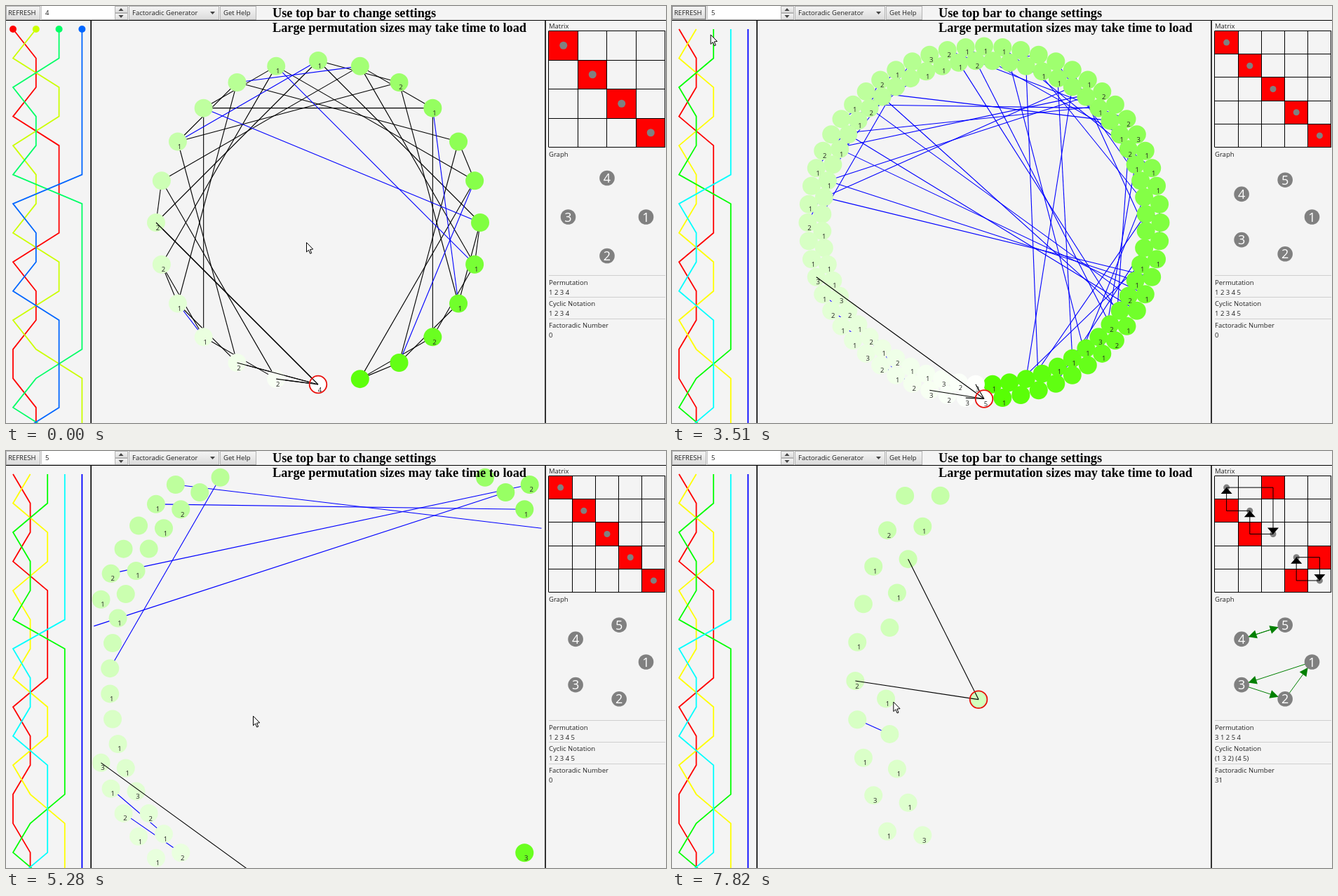
Write an HTML page with a canvas that moves like this. It is 941 px wide and 595 px high and loops after 7.99 s.

```html
<!DOCTYPE html>
<html lang="en">
<head>
<meta charset="utf-8">
<title>Permutation explorer</title>
<style>
html, body { margin: 0; width: 941px; height: 595px; overflow: hidden; background: #f4f4f4; }
canvas { display: block; }
</style>
</head>
<body>
<canvas id="stage" width="941" height="595"></canvas>
<script>
const g = document.getElementById('stage').getContext('2d');
const LOOP = 7990, STEP = 77, TAU = Math.PI * 2;
const SANS = '"Open Sans", "Noto Sans", sans-serif';
const SERIF = '"Liberation Serif", serif';
const REFRESH_AT = 2800, COUNT_AT = 1800, PICK_AT = 6580, DROP_AT = 7270;
const VIEW = { l: 122, t: 21, r: 768, b: 595 };
const DOT = 13;

// time, x, y
const POINTER = [
  [110, 428, 337], [190, 431, 337], [343, 431, 337], [1190, 144, 6], [1420, 164, 8],
  [1573, 164, 8], [1900, 184, 20], [2420, 50, 24], [2500, 8, 27], [2573, 8, 27],
  [2650, 27, 13], [3430, 29, 13], [4280, 350, 356], [4660, 352, 362], [5280, 352, 378],
  [6200, 413, 315], [6580, 306, 304], [7270, 438, 356], [7363, 438, 357],
  [7600, 385, 371], [7820, 312, 357]
];
// time, zoom, centre x, centre y
const CAMERA = [
  [4273, 1, 445, 309], [4350, 1.1, 445, 309], [4500, 1.1, 445, 309], [4580, 1.2, 449, 312],
  [4660, 1.3, 453.5, 316.5], [5280, 1.5, 495, 328.5], [6200, 2.1, 789.5, 328]
];

function track(keys, t) {
  if (t <= keys[0][0]) return keys[0].slice(1);
  for (let i = 1; i < keys.length; i++) {
    const a = keys[i - 1], b = keys[i];
    if (t < b[0]) {
      const u = (t - a[0]) / (b[0] - a[0]);
      return a.slice(1).map((v, j) => v + (b[j + 1] - v) * u);
    }
  }
  return keys[keys.length - 1].slice(1);
}

function permutations(items) {
  if (!items.length) return [[]];
  return items.flatMap(v => permutations(items.filter(w => w !== v)).map(p => [v, ...p]));
}

// Nodes in lexicographic order, joined to inverses and to adjacent value swaps
function buildGraph(n) {
  const perms = permutations([...Array(n).keys()]);
  const index = new Map(perms.map((p, i) => [p.join(), i]));
  return {
    n,
    size: perms.length,
    fixed: perms.map(p => p.filter((v, i) => v === i).length),
    inverse: perms.map(p => index.get(p.map((_, i) => p.indexOf(i)).join())),
    near: perms.map(p => [...Array(n - 1).keys()].map(a =>
      index.get(p.map(v => v === a ? a + 1 : v === a + 1 ? a : v).join())))
  };
}
const graphs = { 4: buildGraph(4), 5: buildGraph(5) };

function line(color, width, ...pts) {
  g.beginPath();
  pts.forEach(p => g.lineTo(p[0], p[1]));
  g.strokeStyle = color;
  g.lineWidth = width;
  g.stroke();
}
function disc(x, y, r, color) {
  g.beginPath();
  g.arc(x, y, r, 0, TAU);
  g.fillStyle = color;
  g.fill();
}
function shape(color, ...pts) {
  g.beginPath();
  pts.forEach(p => g.lineTo(p[0], p[1]));
  g.closePath();
  g.fillStyle = color;
  g.fill();
}
function text(s, x, y, size = 9.5, color = '#222', align = 'left') {
  g.font = size + 'px ' + SANS;
  g.textAlign = align;
  g.fillStyle = color;
  g.fillText(s, x, y);
}
// Triangle whose tip is at (x, y), pointing along angle a
function arrow(x, y, a, length, half, color) {
  const c = Math.cos(a), s = Math.sin(a), bx = x - length * c, by = y - length * s;
  shape(color, [x, y], [bx - half * s, by + half * c], [bx + half * s, by - half * c]);
}

function button(x, y, w, h) {
  const fill = g.createLinearGradient(0, y, 0, y + h);
  fill.addColorStop(0, '#f6f6f6');
  fill.addColorStop(1, '#dadada');
  g.fillStyle = fill;
  g.fillRect(x, y, w, h);
  g.strokeStyle = '#b4b4b4';
  g.lineWidth = 1;
  g.strokeRect(x + .5, y + .5, w - 1, h - 1);
}

function drawToolbar(count, hover) {
  button(0, 0, 49, 20);
  if (hover) {
    g.strokeStyle = '#888';
    g.strokeRect(.5, .5, 47, 18);
  }
  text('REFRESH', 3, 13);
  g.fillStyle = '#fff';
  g.fillRect(50, 0, 105, 19);
  line('#c4c4c4', 1, [50.5, 0], [50.5, 19.5], [155, 19.5]);
  text(count, 56, 13);
  button(155, 0, 19, 10);
  button(155, 10, 19, 10);
  arrow(164, 3, -Math.PI / 2, 4, 3.5, '#444');
  arrow(164, 17, Math.PI / 2, 4, 3.5, '#444');
  button(175, 0, 129, 20);
  text('Factoradic Generator', 180, 13);
  arrow(294.5, 12, Math.PI / 2, 4, 3.5, '#444');
  button(305, 0, 52, 20);
  text('Get Help', 310, 13);
  line('#000', 1, [0, 20.5], [941, 20.5]);
}

// Strands follow the swaps of Heap's algorithm
function drawStrands(n) {
  const swaps = '01 02 01 02 01 03 01 02 01 02 01 13 01 02'.split(' ');
  const gap = 98.4 / (n - 1), slots = [...Array(n).keys()];
  const paths = slots.map(i => [[10 + i * gap, 33]]);
  swaps.forEach((s, k) => {
    const [a, b] = s;
    [slots[a], slots[b]] = [slots[b], slots[a]];
    slots.forEach((id, i) => paths[id].push([10 + i * gap, 33 + 41.53 * (k + 1)]));
  });
  paths.forEach((p, i) => {
    const color = `hsl(${360 * i / (n + 1)} 100% 50%)`;
    line(color, 1.8, ...p);
    if (n === 4) disc(p[0][0], 33, 5, color);
  });
}

function drawPanel(n, picked) {
  const perm = picked ? [2, 0, 1, 4, 3] : [...Array(n).keys()];
  const cell = 166 / n, mid = i => cell * (i + .5);
  const x0 = 774, y0 = 35.5, spot = i => [x0 + mid(i), y0 + mid(i)];
  text('Matrix', 774, 32);
  perm.forEach((c, r) => {
    g.fillStyle = '#f00';
    g.fillRect(x0 + c * cell, y0 + r * cell, cell, cell);
  });
  for (let i = 0; i <= n; i++) {
    const x = Math.floor(x0 + i * cell - .01) + .5, y = Math.floor(y0 + i * cell) + .5;
    line('#000', 1, [x, y0], [x, y0 + 166]);
    line('#000', 1, [x0, y], [x0 + 166, y]);
  }
  perm.forEach((_, i) => disc(...spot(i), n === 4 ? 5.5 : 4.5, '#808080'));
  if (picked) perm.forEach((c, r) => {
    const a = spot(r), b = spot(c);
    line('#000', 1, a, [b[0], a[1]], b);
    arrow(b[0], b[1], c > r ? Math.PI / 2 : -Math.PI / 2, 9, 8, '#000');
  });

  text('Graph', 774, 215);
  const ring = i => [857 + 55.5 * Math.cos(TAU * i / n), 301 + 55.5 * Math.sin(TAU * i / n)];
  if (picked) perm.forEach((to, from) => {
    const a = ring(from), b = ring(to), dir = Math.atan2(b[1] - a[1], b[0] - a[0]);
    line('#008000', 1, a, b);
    arrow(b[0] - 10 * Math.cos(dir), b[1] - 10 * Math.sin(dir), dir, 12, 6, '#008000');
  });
  perm.forEach((_, i) => {
    const [x, y] = ring(i);
    disc(x, y, 10.8, '#808080');
    text(i + 1, x, y + 6.5, 18, '#fff', 'center');
  });

  const row = perm.map(v => v + 1).join(' ');
  [['Permutation', row], ['Cyclic Notation', picked ? '(1 3 2) (4 5)' : row],
    ['Factoradic Number', picked ? 31 : 0]].forEach(([name, value], i) => {
    const y = 384.5 + 30.8 * i;
    line('#cfcfcf', 1, [774, Math.floor(y) + .5], [940, Math.floor(y) + .5]);
    text(name, 774, y + 13);
    text(value, 774, y + 27);
  });
}

function drawGraph(graph, t, picked) {
  const [zoom, cx, cy] = track(CAMERA, t), scale = Math.round(zoom * 10) / 10;
  const chosen = picked ? 31 : 0, { size } = graph;
  const pos = graph.fixed.map((_, i) => {
    const r = scale * (size > 24 && i % 2 === 0 ? 251.5 : 231), a = TAU * i / size;
    return [cx - r * Math.sin(a), cy + r * Math.cos(a)];
  });
  if (picked) {
    const from = track(POINTER, PICK_AT), to = track(POINTER, Math.min(t, DROP_AT));
    pos[31] = pos[31].map((v, j) => v + to[j] - from[j]);
  }
  const seen = ([x, y]) => x >= VIEW.l && x <= VIEW.r && y >= VIEW.t && y <= 600;
  const whole = ([x, y]) =>
    x - DOT >= 121 && x + DOT <= 768.5 && y - DOT >= 19.5 && y + DOT <= 597.5;
  const link = (a, b, color) => line(color, 1.1, pos[a], pos[b]);

  function node(i) {
    const [x, y] = pos[i], s = i / size;
    if (!whole(pos[i])) return;
    disc(x, y, DOT, `rgb(${255 - 170 * s},255,${255 - 255 * s})`);
    if (graph.fixed[i]) text(graph.fixed[i], x + 2.5, y + 10.5, 9.5, '#222', 'center');
  }

  g.save();
  g.beginPath();
  g.rect(VIEW.l, VIEW.t, VIEW.r - VIEW.l, VIEW.b - VIEW.t);
  g.clip();
  if (graph.n === 4) graph.near.forEach((list, i) =>
    list.forEach(j => { if (i < j) link(i, j, '#000'); }));
  graph.inverse.forEach((j, i) => {
    if (i < j && seen(pos[i]) && seen(pos[j])) link(i, j, '#00f');
  });
  for (let i = size - 1; i >= 0; i--) if (i !== chosen) node(i);
  node(chosen);
  graph.near[chosen].forEach(j => {
    if (!picked || seen(pos[j])) link(chosen, j, '#000');
  });
  if (whole(pos[chosen])) {
    g.beginPath();
    g.arc(...pos[chosen], 12.3, 0, TAU);
    g.strokeStyle = '#e8100c';
    g.lineWidth = 1.8;
    g.stroke();
  }
  g.restore();
}

function drawPointer(x, y) {
  g.save();
  g.translate(x + .5, y + .5);
  shape('#fff', [0, 0], [0, 13.5], [3, 10.7], [5.2, 15.8], [7.2, 15], [5, 10], [9.2, 9.5]);
  g.strokeStyle = '#000';
  g.lineWidth = 1;
  g.stroke();
  g.restore();
}

function draw(now) {
  const raw = now % LOOP;
  const t = raw < 110 ? 0 : 110 + Math.floor((raw - 110) / STEP + .05) * STEP;
  const n = t >= REFRESH_AT - 40 ? 5 : 4, picked = t >= PICK_AT;
  g.fillStyle = '#f4f4f4';
  g.fillRect(0, 0, 941, 595);
  drawStrands(n);
  drawGraph(graphs[n], t, picked);
  drawPanel(n, picked);
  drawToolbar(t >= COUNT_AT ? 5 : 4, t >= 2600 && t < 3600);
  line('#000', 1.6, [121.2, 20], [121.2, 595]);
  line('#000', 1.6, [769, 20], [769, 595]);
  g.font = 'bold 18.3px ' + SERIF;
  g.textAlign = 'left';
  g.fillStyle = '#000';
  g.fillText('Use top bar to change settings', 380, 16);
  g.fillText('Large permutation sizes may take time to load', 380, 37);
  drawPointer(...track(POINTER, t));
}

const start = performance.now();
function tick() {
  draw(performance.now() - start);
  requestAnimationFrame(tick);
}
tick();
</script>
</body>
</html>
```
